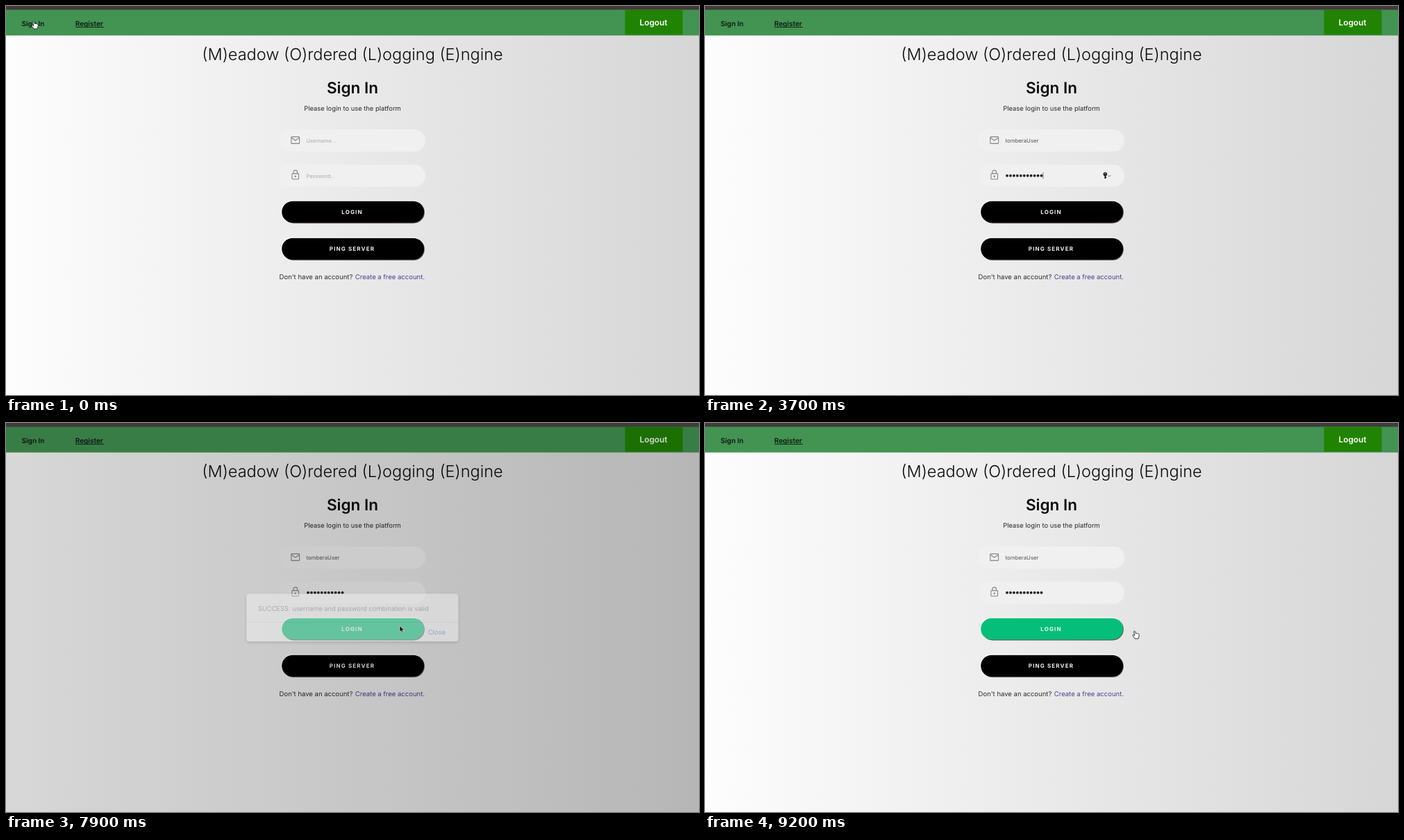
Write an HTML page that moves like this. It is 998 px wide and 561 px high and loops after 9.3 s.

```html
<!DOCTYPE html>
<html lang="en">
<head>
<meta charset="utf-8">
<title>Sign In</title>
<style>
  html, body { margin: 0; width: 100%; height: 100%; overflow: hidden; }
  svg { display: block; width: 100vw; height: 100vh; }
  text { font-family: Inter, "Open Sans", sans-serif; white-space: pre; text-rendering: geometricPrecision; }
  .hint { font-size: 7.5px; fill: #aaa; }
  .btn { font-size: 8px; font-weight: 700; letter-spacing: 1.15px; fill: #f2f2f2; }
  .icon { fill: none; stroke: #858585; stroke-width: 1.1; stroke-linejoin: round; }
  .menu { font-size: 8.6px; font-weight: 500; fill: #fff; }
</style>
</head>
<body>
<svg viewBox="0 0 998 561" preserveAspectRatio="none">
  <defs>
    <linearGradient id="bg">
      <stop offset="0" stop-color="#fdfdfd"/>
      <stop offset="1" stop-color="#d6d6d6"/>
    </linearGradient>
    <filter id="shadow" x="-20%" y="-40%" width="140%" height="190%">
      <feDropShadow dx="0" dy="1.5" stdDeviation="2.2" flood-opacity=".4"/>
    </filter>
    <g id="key">
      <circle cx="576.3" cy="-2" r="2.8" fill="#222"/>
      <circle cx="576.3" cy="-3" r=".7" fill="#eee"/>
      <path d="M576.3 0V4.6M577 2.6h1.2" stroke="#222" stroke-width="1.8"/>
      <path d="M580.6 -.2l1.7 1.7 1.7-1.7" fill="none" stroke="#555"/>
    </g>
    <g id="pill">
      <rect x="396.2" y="-16.6" width="205" height="32.4" rx="16.2" fill="#fff"/>
      <rect x="398.4" y="-14.6" width="204.4" height="31.6" rx="15.8" fill="#5c5052"/>
    </g>
  </defs>

  <rect width="998" height="561" fill="url(#bg)"/>
  <rect width="998" height="6" fill="#423b3a"/>
  <rect y="5.5" width="998" height="37" fill="#439352"/>
  <rect x="891.5" y="6" width="83" height="35.5" fill="#218302"/>
  <g font-size="10" font-weight="600" fill="#0c1a10">
    <text x="22.5" y="28.8">Sign In</text>
    <text x="99.8" y="28.8">Register</text>
    <path d="M100 30.5h41" stroke="#0c1a10" stroke-width=".9"/>
  </g>
  <text x="932.5" y="28.2" font-size="11.8" font-weight="600" fill="#fff" text-anchor="middle">Logout</text>

  <g text-anchor="middle" fill="#0a0a0a">
    <text x="499" y="78.3" font-size="23.5" font-weight="300">(M)eadow (O)rdered (L)ogging (E)ngine</text>
    <text x="499" y="126.4" font-size="22.5" font-weight="600">Sign In</text>
    <text x="499" y="150.6" font-size="9.4" fill="#2a2a2a">Please login to use the platform</text>
  </g>

  <g fill="#f0f0f0">
    <rect x="393.5" y="178" width="210.5" height="32" rx="16"/>
    <rect x="393.5" y="228.7" width="210.5" height="32" rx="16"/>
  </g>
  <g class="icon">
    <rect x="410.8" y="188.6" width="11.8" height="9.8" rx="1"/>
    <path d="M411 190l5.7 4 5.7-4"/>
    <rect x="411.9" y="241.6" width="9.6" height="8.2" rx="1"/>
    <path d="M413.8 241.4v-1.6a2.9 2.9 0 0 1 5.8 0v1.6"/>
    <circle cx="416.7" cy="245.7" r=".7"/>
  </g>
  <text class="hint" id="userHint" x="432.5" y="197">Username...</text>
  <text id="user" x="432.5" y="197" font-size="7.8" fill="#555"></text>
  <text class="hint" id="passHint" x="432.5" y="247.6">Password...</text>
  <g id="dots" fill="#1c1c1c"></g>
  <use id="userKey" href="#key" y="194"/>
  <use id="passKey" href="#key" y="244.5"/>
  <rect id="caret" width="1" height="9.4" fill="#777"/>

  <use href="#pill" y="296.5"/>
  <rect id="login" x="397.2" y="281.4" width="204.8" height="31" rx="15.5"/>
  <text class="btn" x="483.2" y="299.5">LOGIN</text>
  <use href="#pill" y="349.8"/>
  <rect x="397.2" y="334.7" width="204.8" height="31" rx="15.5"/>
  <text class="btn" x="465.8" y="352.9">PING SERVER</text>
  <g font-size="9.5">
    <text x="393.6" y="394.4" fill="#2a2a2a">Don't have an account?</text>
    <text x="502.8" y="394.4" fill="#4a3d92">Create a free account.</text>
  </g>

  <g id="menu">
    <rect x="389" y="262.3" width="118.4" height="39.6" rx="4.5" fill="#4a4443" stroke="#777" stroke-width=".7" filter="url(#shadow)"/>
    <rect x="393.3" y="266.6" width="109.6" height="15.5" rx="2" fill="#3084dc"/>
    <text class="menu" x="398.3" y="277.5">Passwords...</text>
    <text class="menu" x="398.3" y="293.2">Suggest New Password</text>
  </g>

  <rect id="veil" y="5" width="998" height="556"/>
  <g id="card">
    <rect x="346.3" y="246.3" width="305" height="68.6" rx="4" fill="#fbfbfb" filter="url(#shadow)"/>
    <path d="M346.3 287.5h305" stroke="#dcdcdc" stroke-width=".9"/>
    <text x="363" y="271.3" font-size="9.4" font-weight="300" fill="#555">SUCCESS: username and password combination is valid</text>
    <text x="607.7" y="305" font-size="9.4" fill="#2f7ce0">Close</text>
  </g>

  <g id="cursor">
    <path id="arrow" d="M-2.6-5.2V3.9L-.6 2 .8 5.4 2.4 4.7 1 1.4H4Z" fill="#111" stroke="#fff" stroke-width=".6"/>
    <path id="hand" d="M-2.9-4.7C-2.5-5.7-1.3-5.5-.9-4.5L-.1-1.9C.6-2.5 1.4-2.3 1.7-1.7 2.4-2.2 3.2-1.9 3.4-1.2 4.3-1.4 4.8-.7 4.8.2 4.9 2 4.2 3.2 3.8 4.2L3.7 5.4-1.4 5.6C-2 4.1-3.7 2.6-4.5 1.2-4.9.2-3.7-.3-2.9.4L-1.8 1.2Z" fill="#fff" stroke="#222" stroke-width=".9" stroke-linejoin="round"/>
    <path id="beam" d="M-2.2-5.2Q0-5.2 0-4Q0-5.2 2.2-5.2M0-4V4M-2.2 5.2Q0 5.2 0 4Q0 5.2 2.2 5.2M-1 1.6H1" fill="none" stroke="#333" stroke-width=".9"/>
  </g>
</svg>
<script>
const LOOP = 9300, STEP = 100, NAME = "tomberaUser", DOTS = 11;
const $ = id => document.getElementById(id);
const show = (id, on) => { $(id).style.display = on ? "" : "none"; };
const clamp = v => Math.min(1, Math.max(0, v));
const ramp = (t, a, b) => clamp((t - a) / (b - a));
const smooth = p => p * p * (3 - 2 * p);

// Pointer stops: time, x, y
const path = [
  [0, 41.5, 27.5], [1000, 423, 179], [1200, 452, 192], [1800, 470, 198],
  [2000, 491, 229], [2100, 491, 238.5], [5100, 491, 238.5], [5200, 515, 254],
  [5400, 663, 300], [5500, 663, 300], [5600, 660, 298], [5800, 656, 299],
  [6400, 656, 299], [7400, 568.5, 298], [7900, 569.5, 297.5],
  [8300, 569.5, 297.5], [8800, 620.5, 305.5], [LOOP, 620.5, 305.5]
];

for (let i = 0; i < DOTS; i++) {
  const dot = document.createElementNS("http://www.w3.org/2000/svg", "circle");
  dot.setAttribute("cx", 435 + 4.95 * i);
  dot.setAttribute("cy", 244.7);
  dot.setAttribute("r", 1.9);
  $("dots").append(dot);
}

function pointer(t) {
  const i = path.findIndex(p => p[0] > t);
  const [t0, x0, y0] = path[i - 1], [t1, x1, y1] = path[i];
  const p = smooth(ramp(t, t0, t1));
  return [x0 + (x1 - x0) * p, y0 + (y1 - y0) * p];
}

function drawCursor(t, x, y) {
  const inX = x > 394 && x < 604;
  const modal = t >= 7900;
  const beam = !modal && inX && ((y > 178 && y < 210) || (y > 229 && y < 261));
  const hand = modal ? x > 606 : t < 200 || (inX && y > 281 && y < 313);
  const typing = (t >= 1300 && t < 1900) || (t >= 2700 && t < 5200);
  show("cursor", !typing);
  show("beam", beam);
  show("hand", hand);
  show("arrow", !beam && !hand);
  $("cursor").setAttribute("transform", `translate(${x} ${y})`);
}

function drawForm(t) {
  const typed = Math.round(NAME.length * ramp(t, 1100, 1900));
  const dots = Math.round(DOTS * ramp(t, 2600, 3700));
  $("user").textContent = NAME.slice(0, typed);
  show("userHint", !typed);
  show("passHint", !dots);
  [...$("dots").children].forEach((d, i) => { d.style.display = i < dots ? "" : "none"; });

  const inUser = t >= 1100 && t < 2200;
  const inPass = t >= 2200 && t < 7600;
  show("userKey", inUser);
  show("passKey", inPass);
  show("menu", t >= 2300 && t < 2700);

  const blink = t < 4200 || Math.floor((t - 4200) / 500) % 2 === 1;
  show("caret", inUser || (inPass && t >= 2600 && blink));
  const x = inUser ? 432.5 + (typed ? $("user").getComputedTextLength() : 0)
                   : dots ? 432 + 4.95 * dots : 432.6;
  $("caret").setAttribute("x", x);
  $("caret").setAttribute("y", inUser ? 189.5 : 239.8);
}

function drawDialog(t) {
  const open = ramp(t, 7830, 8010);
  $("veil").style.opacity = .385 * open * (1 - ramp(t, 8950, 9165));
  $("card").style.opacity = open * (1 - ramp(t, 8950, 9195));
}

function draw(t) {
  drawForm(t);
  drawCursor(t, ...pointer(t));
  drawDialog(t);
  const hover = ramp(t, 6900, 7200);
  $("login").setAttribute("fill", `rgb(${5 * hover},${190 * hover},${121 * hover})`);
}

const start = performance.now();
function tick() {
  const t = (performance.now() - start) % LOOP;
  draw(Math.floor(t / STEP) * STEP);
  requestAnimationFrame(tick);
}
tick();
</script>
</body>
</html>
```
